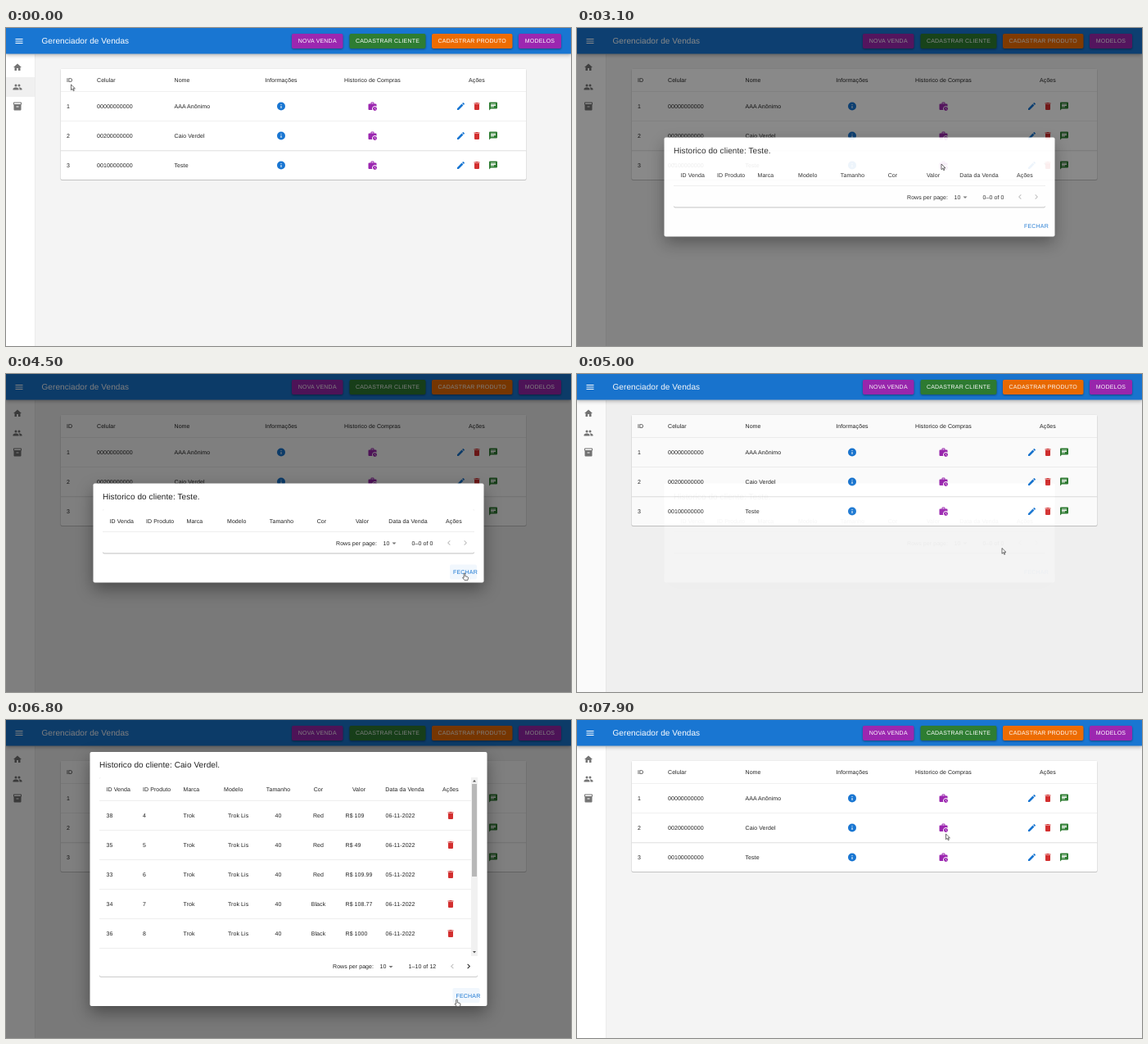
Recreate the animation shown at these times as an HTML page. Size 690 by 388 pixels, loop 8000 ms.

```html
<!DOCTYPE html>
<html lang="pt-BR">
<head>
<meta charset="utf-8">
<title>Gerenciador de Vendas</title>
<style>
  html, body { margin: 0; width: 100%; height: 100%; overflow: hidden; background: #f4f4f4; }
  svg { display: block; width: 100vw; height: 100vh; }
  text { font: 14px "Liberation Sans", Arial, sans-serif; letter-spacing: .15px; fill: #212121;
         text-rendering: geometricPrecision; white-space: pre; }
  .title { font-size: 20px; }
  .btn { letter-spacing: .4px; }
  .bar { filter: drop-shadow(0 3px 4px rgba(0,0,0,.3)); }
  .raised { filter: drop-shadow(0 2px 2px rgba(0,0,0,.38)); }
  .paper { filter: drop-shadow(0 1px 1.5px rgba(0,0,0,.4)); }
  .dialog { filter: drop-shadow(0 16px 20px rgba(0,0,0,.38)); }
</style>
</head>
<body>
<svg id="stage" viewBox="0 0 1380 776" preserveAspectRatio="none">
  <defs>
    <symbol id="menu" viewBox="0 0 24 24"><path d="M3 18h18v-2H3zM3 13h18v-2H3zM3 6v2h18V6z"/></symbol>
    <symbol id="home" viewBox="0 0 24 24"><path d="M10 20v-6h4v6h5v-8h3L12 3 2 12h3v8z"/></symbol>
    <symbol id="people" viewBox="0 0 24 24">
      <circle cx="16" cy="8" r="3"/><circle cx="8" cy="8" r="3"/>
      <path d="M8 13c-2.3 0-7 1.2-7 3.5V19h14v-2.5c0-2.3-4.7-3.5-7-3.5zM16 13l-1 .05c1.2.8 2 2 2 3.45V19h6v-2.5c0-2.3-4.7-3.5-7-3.5z"/>
    </symbol>
    <symbol id="box" viewBox="0 0 24 24">
      <path fill-rule="evenodd" d="M20 2H4c-1 0-2 .9-2 2v3c0 .7.4 1.3 1 1.7V20c0 1.1 1.1 2 2 2h14c.9 0 2-.9 2-2V8.7c.6-.4 1-1 1-1.7V4c0-1.1-1-2-2-2zM15 14H9v-2h6zM20 7H4V4h16z"/>
    </symbol>
    <symbol id="info" viewBox="0 0 24 24"><path fill-rule="evenodd" d="M2 12a10 10 0 0 1 20 0a10 10 0 0 1-20 0zM11 17h2v-6h-2zM11 9h2V7h-2z"/></symbol>
    <symbol id="history" viewBox="0 0 24 24">
      <path fill-rule="evenodd" d="M18 11c1.5 0 2.9.5 4 1.3V8a2 2 0 0 0-2-2h-4V4a2 2 0 0 0-2-2h-4a2 2 0 0 0-2 2v2H4a2 2 0 0 0-2 2v11a2 2 0 0 0 2 2h7.7A7 7 0 0 1 18 11zM10 4h4v2h-4z"/>
      <path fill-rule="evenodd" d="M13 18a5 5 0 0 1 10 0a5 5 0 0 1-10 0zM19.7 20.3l.7-.7-1.9-1.8V15h-1v3.2z"/>
    </symbol>
    <symbol id="edit" viewBox="0 0 24 24"><path d="M3 17.25V21h3.75L17.8 9.95 14.05 6.2zM20.7 7c.4-.4.4-1 0-1.4l-2.3-2.3c-.4-.4-1-.4-1.4 0l-1.9 1.8 3.75 3.75z"/></symbol>
    <symbol id="trash" viewBox="0 0 24 24"><path d="M6 19a2 2 0 0 0 2 2h8a2 2 0 0 0 2-2V7H6zM19 4h-3.5l-1-1h-5l-1 1H5v2h14z"/></symbol>
    <symbol id="chat" viewBox="0 0 24 24"><path fill-rule="evenodd" d="M20 2H4a2 2 0 0 0-2 2v18l4-4h14a2 2 0 0 0 2-2V4a2 2 0 0 0-2-2zM6 9h12v2H6zM14 14H6v-2h8zM18 8H6V6h12z"/></symbol>
    <symbol id="drop" viewBox="0 0 24 24"><path d="M7 10l5 5 5-5z"/></symbol>
    <symbol id="prev" viewBox="0 0 24 24"><path d="M15.4 7.4L14 6l-6 6 6 6 1.4-1.4L10.8 12z"/></symbol>
    <symbol id="next" viewBox="0 0 24 24"><path d="M8.6 16.6L13.2 12 8.6 7.4 10 6l6 6-6 6z"/></symbol>
  </defs>
  <g id="page"></g>
  <g id="modals"></g>
  <g id="cursor" fill="#fff" stroke="#222" stroke-width="1.3" stroke-linejoin="round">
    <path id="arrow" d="M0 0v13.5l3.2-3 2.4 5 2-1-2.4-4.8h4.6z"/>
    <path id="hand" d="M-1.6 1.5a1.6 1.6 0 0 1 3.2 0v6l5.6 1.4q2 .8 1.7 3l-1.2 5.4h-7.6l-4.8-6q.5-2 2-1.2l1.1 1z"/>
  </g>
</svg>
<script>
const LOOP = 8000, STEP = 100;
const BLUE = '#1976d2', PURPLE = '#9c27b0', GREEN = '#2e7d32', ORANGE = '#ed6c02', RED = '#d32f2f', GREY = '#757575';
const $ = id => document.getElementById(id);

const rect = (x, y, w, h, fill, extra = '') =>
  `<rect x="${x}" y="${y}" width="${w}" height="${h}" fill="${fill}" ${extra}/>`;
const text = (x, y, s, extra = '') => `<text x="${x}" y="${y}" ${extra}>${s}</text>`;
const mid = (x, y, s) => text(x, y, s, 'text-anchor="middle"');
const icon = (id, cx, cy, fill) =>
  `<use href="#${id}" x="${cx - 12}" y="${cy - 12}" width="24" height="24" fill="${fill}"/>`;
const button = (x, w, label, fill) =>
  rect(x, 14, w, 36, fill, 'rx="4" class="raised"') +
  text(x + w / 2, 36.5, label, 'text-anchor="middle" class="btn" style="fill:#fff"');

// Main page
const clients = [
  ['1', '00000000000', 'AAA Anônimo'],
  ['2', '00200000000', 'Caio Verdel'],
  ['3', '00100000000', 'Teste']
];
const ICON_X = 895;
const rowY = i => 191 + 72 * i;

function clientRow([id, phone, name], i) {
  const y = rowY(i), base = y + 4;
  const line = i < 2 ? rect(133, y + 35.5, 1138, i + 1, '#e0e0e0') : '';
  return line + text(148, base, id) + text(222, base, phone) + text(411, base, name) +
    icon('info', 672, y, BLUE) + icon('history', ICON_X, y, PURPLE) +
    icon('edit', 1111, y, BLUE) + icon('trash', 1150, y, RED) + icon('chat', 1190, y, GREEN);
}

$('page').innerHTML =
  rect(0, 0, 1380, 776, '#f4f4f4') +
  rect(0, 64, 71, 712, '#fff') + rect(70, 64, 1, 712, '#dcdcdc') +
  rect(0, 120, 70, 48, '#f0f0f0', 'id="sideHover"') +
  icon('home', 28, 96, GREY) + icon('people', 28, 144, GREY) + icon('box', 28, 191, GREY) +
  rect(0, 0, 1380, 63, BLUE, 'class="bar"') + icon('menu', 32, 32, '#fff') +
  text(87, 38.5, 'Gerenciador de Vendas', 'class="title" style="fill:#fff"') +
  button(698, 125, 'NOVA VENDA', PURPLE) + button(839, 186, 'CADASTRAR CLIENTE', GREEN) +
  button(1040, 197, 'CADASTRAR PRODUTO', ORANGE) + button(1252, 104, 'MODELOS', PURPLE) +
  rect(133, 99, 1138, 271, '#fff', 'rx="4" class="paper"') +
  text(148, 131, 'ID') + text(222, 131, 'Celular') + text(411, 131, 'Nome') +
  mid(672, 131, 'Informações') + mid(ICON_X, 131, 'Historico de Compras') + mid(1150, 131, 'Ações') +
  rect(133, 154, 1138, 1, '#e0e0e0') +
  `<circle id="iconHover" cx="${ICON_X}" r="20" fill="${PURPLE}" opacity=".05"/>` +
  clients.map(clientRow).join('');

// Dialogs
const sales = [
  [38, 4, 'Red', '109', '06'],
  [35, 5, 'Red', '49', '06'],
  [33, 6, 'Red', '109.99', '05'],
  [34, 7, 'Black', '108.77', '06'],
  [36, 8, 'Black', '1000', '06']
];

const saleHead = (dx, y) =>
  text(245 + dx, y, 'ID Venda') + text(334 + dx, y, 'ID Produto') + text(433 + dx, y, 'Marca') +
  text(532 + dx, y, 'Modelo') + mid(665 + dx, y, 'Tamanho') + mid(763 + dx, y, 'Cor') +
  mid(862 + dx, y, 'Valor') + mid(974 + dx, y, 'Data da Venda') + mid(1086 + dx, y, 'Ações');

function saleRow([id, product, color, price, day], i) {
  const y = 237 + 72 * i;
  return text(245, y, id) + text(334, y, product) + text(433, y, 'Trok') + text(542, y, 'Trok Lis') +
    mid(665, y, 40) + mid(763, y, color) + text(829, y, 'R$ ' + price) +
    text(927, y, day + '-11-2022') + icon('trash', 1086, y - 4, RED) +
    rect(228, y + 31, 908, 1, '#dcdcdc');
}

const pager = (start, right, y, range, nextFill) =>
  text(start - 185, y, 'Rows per page:') + text(start - 70, y, '10') + icon('drop', start - 43, y - 4, GREY) +
  text(start, y, range) + icon('prev', right - 62, y - 5, '#bdbdbd') + icon('next', right - 22, y - 5, nextFill);

const closeButton = (i, x, y) =>
  rect(x - 8, y - 23, 66, 36, BLUE, `id="press${i}" rx="4"`) +
  text(x, y, 'FECHAR', `class="btn" style="fill:${BLUE}"`);

const dialog = (i, x, y, w, h, name, body) =>
  `<g id="dialog${i}">` + rect(0, 0, 1380, 776, '#000', 'opacity=".5"') +
  rect(x, y, w, h, '#fff', 'rx="4" class="dialog"') +
  text(x + 23, y + 38, `Historico do cliente: ${name}.`, 'class="title"') + body + '</g>';

const scrollbar =
  rect(1136, 140, 16, 436, '#f1f1f1') + rect(1138, 156, 12, 226, '#b8b8b8') +
  '<path d="M1140 151l4-5 4 5zM1140 564l4 5 4-5z" fill="#505050"/>';

$('modals').innerHTML =
  dialog(0, 213, 267, 954, 242, 'Teste',
    rect(236, 330, 908, 107, '#fff', 'rx="4" class="paper"') + saleHead(8, 363) +
    rect(236, 385, 908, 1, '#dcdcdc') + pager(991, 1144, 417, '0–0 of 0', '#bdbdbd') +
    closeButton(0, 1092, 488)) +
  dialog(1, 205, 78, 970, 620, 'Caio Verdel',
    rect(228, 140, 924, 486, '#fff', 'rx="4" class="paper"') +
    rect(228, 196, 908, 72, '#000', 'id="rowHover" opacity=".07"') +
    saleHead(0, 174) + rect(228, 196, 908, 1, '#dcdcdc') + sales.map(saleRow).join('') +
    scrollbar + pager(983, 1152, 606, '1–10 of 12', '#212121') +
    closeButton(1, 1099, 677));

// Motion: [time, x, y] of the pointer in stage pixels
const path = [
  [0, 79.5, 69], [150, 110, 72], [900, 451, 121], [1100, 447, 128], [1250, 447, 128],
  [2000, 445, 166], [3800, 445, 166], [4300, 560, 242], [4500, 560, 243], [4850, 560, 243],
  [5000, 519, 212.5], [5400, 458, 152], [5700, 449, 136], [5900, 451, 136.5],
  [6600, 556, 343], [6800, 550.5, 341], [7240, 550.5, 341], [7800, 457, 147], [7900, 450.5, 139], [LOOP, 450.5, 139]
];
const modals = [
  { open: 2950, close: 4850, box: [542, 232, 578, 251] },
  { open: 5750, close: 7110, box: [546, 327, 580, 345] }
];

function pointer(t) {
  const k = Math.max(1, path.findIndex(p => p[0] > t));
  const [t0, x0, y0] = path[k - 1], [t1, x1, y1] = path[k];
  const f = (t - t0) / (t1 - t0);
  return [x0 + (x1 - x0) * f, y0 + (y1 - y0) * f];
}

// cubic-bezier(.4, 0, .2, 1)
function ease(x) {
  if (x <= 0) return 0;
  if (x >= 1) return 1;
  let a = 0, b = 1, u;
  for (let i = 0; i < 20; i++) {
    u = (a + b) / 2;
    const px = 1.2 * u * (1 - u) ** 2 + .6 * u * u * (1 - u) + u ** 3;
    if (px < x) a = u; else b = u;
  }
  return u * u * (3 - 2 * u);
}

const show = (id, on) => $(id).style.display = on ? '' : 'none';

function draw(t) {
  const [x, y] = pointer(t);
  let busy = false, hand = false;

  modals.forEach(({ open, close, box: [l, top, r, b] }, i) => {
    const alpha = ease((t - open) / 225) * (1 - ease((t - close) / 195));
    const over = alpha > 0 && x >= l && x <= r && y >= top && y <= b;
    show('dialog' + i, alpha > 0);
    $('dialog' + i).setAttribute('opacity', alpha);
    $('press' + i).setAttribute('opacity', over ? (t >= close - 110 ? .4 : .06) : 0);
    busy = busy || alpha > 0;
    hand = hand || over;
  });

  const row = Math.floor((y - 98) / 36);
  show('rowHover', row >= 0 && row < 5 && x > 114 && x < 568);
  $('rowHover').setAttribute('y', 196 + 72 * row);

  const target = [0, 1, 2].find(i => Math.hypot(x - ICON_X / 2, y - rowY(i) / 2) < 8);
  const onIcon = !busy && target !== undefined;
  show('iconHover', onIcon);
  if (onIcon) $('iconHover').setAttribute('cy', rowY(target));

  show('sideHover', t < 100);
  show('hand', hand || onIcon);
  show('arrow', !(hand || onIcon));
  $('cursor').setAttribute('transform', `translate(${x * 2} ${y * 2})`);
}

const start = performance.now();
function tick() {
  const t = (performance.now() - start) % LOOP;
  draw(Math.floor(t / STEP) * STEP);
  requestAnimationFrame(tick);
}
tick();
</script>
</body>
</html>
```
